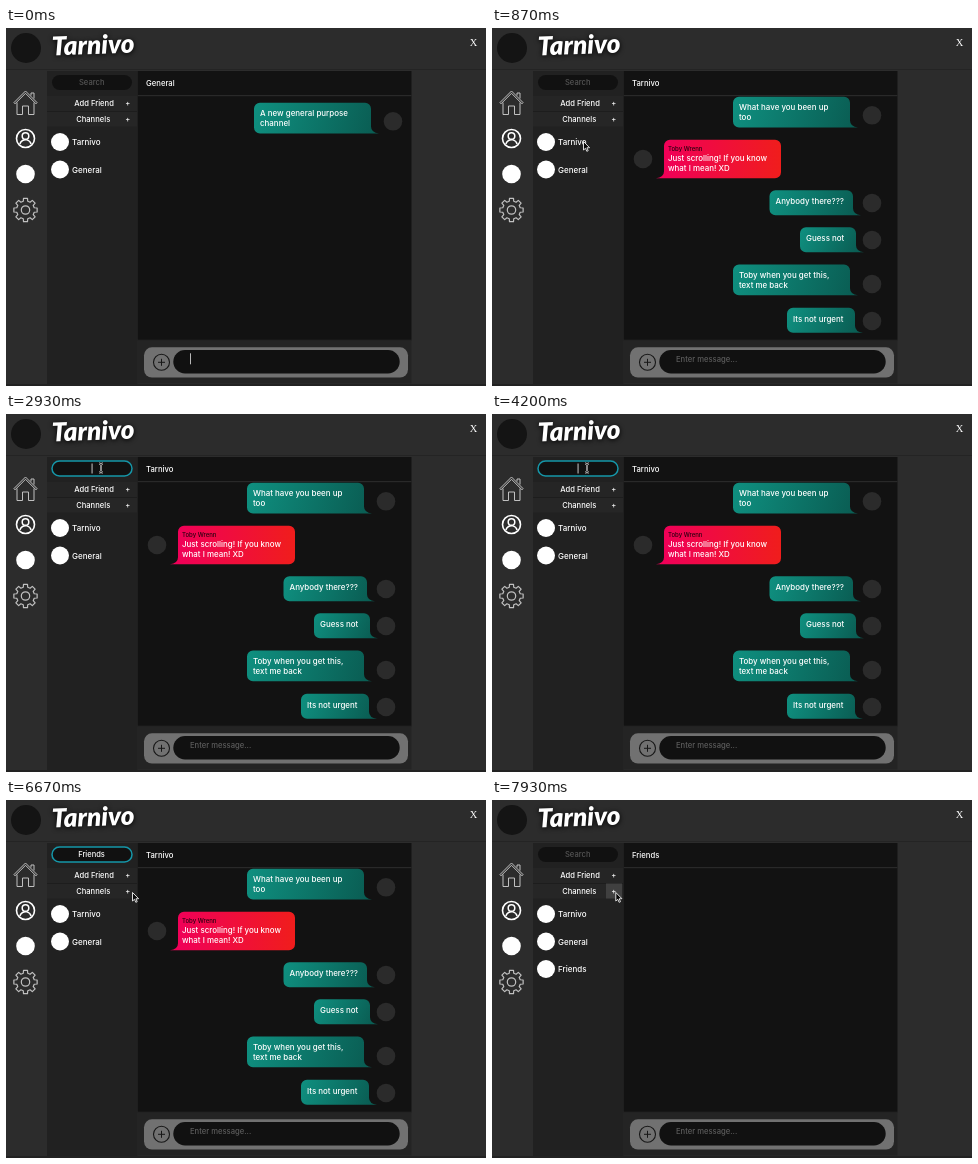
Write an HTML page with a canvas that moves like this. It is 480x358 px and loops after 8 s.

```html
<!DOCTYPE html>
<html lang="en">
<head>
<meta charset="utf-8">
<title>Chat channels</title>
<style>
  html, body { margin: 0; width: 100%; height: 100%; overflow: hidden; background: #2c2c2c; }
  canvas { display: block; width: 480px; height: 358px; }
</style>
</head>
<body>
<canvas id="stage"></canvas>
<script>
const W = 480, H = 358, LOOP = 8000;
const SANS = 'Inter, "Open Sans", sans-serif';
const APP = 'Tarnivo';
const canvas = document.getElementById('stage');
const ctx = canvas.getContext('2d');
const dpr = window.devicePixelRatio || 1;
canvas.width = W * dpr;
canvas.height = H * dpr;

const GENERAL = [
  { x: 248, y: 74.7, w: 117, h: 30.8, lines: ['A new general purpose', 'channel'], avatar: [387, 93.3] }
];
const CHAT = [
  { x: 241, y: 68.7, w: 117, h: 30.8, lines: ['What have you been up', 'too'], avatar: [380, 87.3] },
  { x: 172, y: 111.8, w: 117, h: 38.4, lines: ['Just scrolling! If you know', 'what I mean! XD'], avatar: [151, 131], from: 'Toby Wrenn' },
  { x: 277.5, y: 162.2, w: 83.5, h: 25, lines: ['Anybody there???'], avatar: [380, 175] },
  { x: 308, y: 199.2, w: 56, h: 25, lines: ['Guess not'], avatar: [380, 212] },
  { x: 241, y: 236.5, w: 117, h: 30.8, lines: ['Toby when you get this,', 'text me back'], avatar: [380, 256] },
  { x: 295, y: 279.8, w: 68, h: 25, lines: ['Its not urgent'], avatar: [380, 293] }
];

// Search text: [time, value]
const TYPING = [[4530, 'F'], [4730, 'Fr'], [5200, 'Fri'], [5330, 'Frie'], [5470, 'Frien'], [5600, 'Friend'], [5730, 'Friends']];
// Pointer stops: [time, x, y]
const POINTER = [[70, 174, 236], [200, 157, 212], [400, 157, 212], [730, 91, 113], [1400, 91, 113],
  [1730, 95, 54], [5870, 95, 54], [6200, 112, 64], [6670, 126, 92], [6730, 126, 92], [7070, 123.3, 92]];

const clamp = v => Math.max(0, Math.min(1, v));
const ease = v => v * v * (3 - 2 * v);
const between = (t, a, b) => t >= a && t < b;

function rect(x, y, w, h, color) {
  ctx.fillStyle = color;
  ctx.fillRect(x, y, w, h);
}

function pill(x, y, w, h, r, color) {
  ctx.beginPath();
  ctx.roundRect(x, y, w, h, r);
  ctx.fillStyle = color;
  ctx.fill();
}

function disc(x, y, r, fill, stroke, line = 1) {
  ctx.beginPath();
  ctx.arc(x, y, r, 0, Math.PI * 2);
  if (fill) { ctx.fillStyle = fill; ctx.fill(); }
  if (stroke) { ctx.strokeStyle = stroke; ctx.lineWidth = line; ctx.stroke(); }
}

function label(text, x, y, size = 7.8, color = '#fff', align = 'left') {
  ctx.font = `500 ${size}px ${SANS}`;
  ctx.textAlign = align;
  ctx.textBaseline = 'alphabetic';
  ctx.fillStyle = color;
  ctx.fillText(text, x, y);
}

function poly(points, close) {
  ctx.beginPath();
  points.forEach(([x, y]) => ctx.lineTo(x, y));
  if (close) ctx.closePath();
}

function drawHeader() {
  disc(20, 20, 15, '#141414');
  ctx.save();
  ctx.translate(46, 27.5);
  ctx.rotate(-0.035);
  ctx.shadowColor = '#000';
  ctx.shadowBlur = 5 * dpr;
  ctx.shadowOffsetY = dpr;
  ctx.font = 'italic 900 26px Lato, sans-serif';
  ctx.textAlign = 'left';
  ctx.fillStyle = '#fff';
  ctx.fillText(APP, 0, 0);
  ctx.restore();
  ctx.font = '10.5px "Liberation Serif", serif';
  ctx.textAlign = 'center';
  ctx.fillStyle = '#fff';
  ctx.fillText('X', 467.5, 17.5);
}

function drawNav() {
  ctx.strokeStyle = '#c0c0c0';
  ctx.lineWidth = 1;
  ctx.lineJoin = 'round';
  poly([[8, 74.5], [19.5, 63], [31, 74.5], [30, 75.8], [19.5, 65.3], [9, 75.8]], true);
  ctx.stroke();
  poly([[11, 74.5], [11, 86.5], [16.5, 86.5], [16.5, 78], [22.5, 78], [22.5, 86.5], [28, 86.5], [28, 74.5]]);
  ctx.stroke();
  poly([[25, 67.5], [25, 65], [28, 65], [28, 70.5]]);
  ctx.stroke();

  disc(19.5, 110.5, 9, null, '#fff', 1.6);
  disc(19.5, 108, 3.3, null, '#fff', 1.5);
  ctx.beginPath();
  ctx.arc(19.5, 117.5, 5.8, Math.PI * 1.08, Math.PI * 1.92);
  ctx.stroke();

  disc(19.5, 146, 9.3, '#fff');

  const teeth = [];
  for (let i = 0; i < 8; i++) {
    [[-0.25, 9], [-0.17, 11.8], [0.17, 11.8], [0.25, 9]].forEach(([d, r]) => {
      const a = i * Math.PI / 4 + d;
      teeth.push([19.5 + r * Math.cos(a), 182 + r * Math.sin(a)]);
    });
  }
  poly(teeth, true);
  ctx.strokeStyle = '#c0c0c0';
  ctx.lineWidth = 1.2;
  ctx.stroke();
  disc(19.5, 182, 4.2, null, '#c0c0c0', 1.2);
}

function drawSearch(t) {
  const focused = between(t, 1930, 7730);
  pill(46, 47, 80, 15, 7.5, '#111');
  if (!focused) {
    label('Search', 85.7, 57.3, 7.6, '#555', 'center');
    return;
  }
  ctx.globalAlpha = 0.5 + 0.5 * clamp((t - 1930) / 140);
  ctx.beginPath();
  ctx.roundRect(46, 47, 80, 15, 7.5);
  ctx.strokeStyle = '#1596a8';
  ctx.lineWidth = 1.5;
  ctx.stroke();
  ctx.globalAlpha = 1;

  let value = '';
  for (const [at, text] of TYPING) if (t >= at) value = text;
  label(value, 85.5, 57.3, 7.5, '#fff', 'center');
  const end = 86 + ctx.measureText(value).width / 2;
  const hidden = between(t, 2400, 2930) || between(t, 3400, 3930) ||
    between(t, 6230, 6730) || t >= 7270;
  if (!hidden) rect(end - 0.4, 49.5, 0.9, 10, '#ddd');
}

function drawChannels(t) {
  rect(41, 43, 90.5, 313, '#212121');
  drawSearch(t);
  rect(41, 68, 90, 15, '#252525');
  rect(41, 83.5, 90, 15, '#262626');
  rect(41, 83, 90, 0.7, '#1b1b1b');
  ctx.globalAlpha = clamp((t - 6730) / 200);
  rect(114, 83.5, 16, 15, '#404040');
  ctx.globalAlpha = 1;
  label('Add Friend', 88, 78.2, 7.6, '#fff', 'center');
  label('Channels', 87.2, 93.8, 7.6, '#fff', 'center');
  label('+', 121.7, 78.2, 7.5, '#fff', 'center');
  label('+', 121.7, 93.8, 7.5, '#fff', 'center');
  const names = [APP, 'General'];
  if (t >= 7870) names.push('Friends');
  names.forEach((name, i) => {
    const y = 114 + i * 27.5;
    disc(54, y, 9, '#fff');
    label(name, 66, y + 3, 8);
  });
}

function bubble({ x, y, w, h, lines, avatar, from }) {
  ctx.save();
  ctx.translate(from ? x + w : x, y);
  if (from) ctx.scale(-1, 1);
  const r = 6;
  ctx.beginPath();
  ctx.moveTo(r, 0);
  ctx.arcTo(w, 0, w, r, r);
  ctx.lineTo(w, h - 7);
  ctx.quadraticCurveTo(w, h - 1, w + 8, h);
  ctx.lineTo(r, h);
  ctx.arcTo(0, h, 0, h - r, r);
  ctx.arcTo(0, 0, r, 0, r);
  ctx.closePath();
  const g = ctx.createLinearGradient(0, 0, w, from ? 0 : h);
  g.addColorStop(0, from ? '#f01d1c' : '#0f9080');
  g.addColorStop(1, from ? '#f00058' : '#0a5e54');
  ctx.fillStyle = g;
  ctx.fill();
  ctx.restore();

  if (from) label(from, x + 4, y + 11.5, 6, '#2a0010');
  const first = y + (from ? 20.7 : h === 25 ? 13.8 : 13.5);
  lines.forEach((text, i) => label(text, x + (from ? 4 : 6), first + i * 10, 7.95));
  disc(avatar[0], avatar[1], 9.3, '#2b2b2b');
}

function drawChat(t) {
  rect(131.7, 43, 273.8, 268, '#121212');
  rect(131.7, 67, 273.8, 1.2, '#292929');
  rect(131.7, 311, 273.8, 1.5, '#171717');
  rect(131.7, 312.5, 273.8, 43, '#242424');
  const title = t < 870 ? 'General' : t < 7870 ? APP : 'Friends';
  label(title, 140, 57.5, 7.7);
  if (t < 870) GENERAL.forEach(bubble);
  else if (t < 7870) CHAT.forEach(bubble);

  pill(138, 319.3, 264, 30.3, 8, '#717171');
  disc(155.5, 334.3, 8, null, '#171717', 1.1);
  rect(152, 333.8, 7, 1, '#171717');
  rect(155, 330.8, 1, 7, '#171717');
  pill(167.3, 322, 226.4, 23.5, 11.7, '#111');
  if (t >= 870) label('Enter message...', 184, 333.5, 7.65, '#5c5c5c');
  else if (t < 470) rect(184, 325.3, 0.9, 11, '#ccc');
}

function pointerAt(t) {
  let i = 0;
  while (i < POINTER.length - 1 && POINTER[i + 1][0] <= t) i++;
  const [t0, x0, y0] = POINTER[i];
  const [t1, x1, y1] = POINTER[i + 1] || [t0 + 1, x0, y0];
  const k = ease(clamp((t - t0) / (t1 - t0)));
  return [x0 + (x1 - x0) * k, y0 + (y1 - y0) * k];
}

function drawPointer(t) {
  if (t < 70) return;
  const [x, y] = pointerAt(t);
  const overSearch = between(x, 46, 126) && between(y, 47, 62);
  ctx.save();
  ctx.translate(x, y);
  ctx.lineJoin = 'round';
  if (overSearch) {
    ctx.beginPath();
    ctx.moveTo(-2, -4.5);
    ctx.quadraticCurveTo(0, -4.5, 0, -3);
    ctx.lineTo(0, 3);
    ctx.quadraticCurveTo(0, 4.5, -2, 4.5);
    ctx.moveTo(2, -4.5);
    ctx.quadraticCurveTo(0, -4.5, 0, -3);
    ctx.moveTo(0, 3);
    ctx.quadraticCurveTo(0, 4.5, 2, 4.5);
    ctx.strokeStyle = '#ddd';
    ctx.lineWidth = 2;
    ctx.stroke();
    ctx.strokeStyle = '#111';
    ctx.lineWidth = 0.8;
    ctx.stroke();
  } else {
    poly([[0.5, 0.5], [0.5, 9], [2.5, 7.3], [3.8, 10.3], [5.2, 9.7], [3.9, 6.8], [6.6, 6.7]], true);
    ctx.fillStyle = '#080808';
    ctx.fill();
    ctx.strokeStyle = '#f2f2f2';
    ctx.lineWidth = 0.9;
    ctx.stroke();
  }
  ctx.restore();
}

function draw(t) {
  ctx.setTransform(dpr, 0, 0, dpr, 0, 0);
  rect(0, 0, W, H, '#2c2c2c');
  rect(0, 41, W, 1, '#242424');
  drawHeader();
  drawNav();
  drawChannels(t);
  drawChat(t);
  rect(0, 356, W, 2, '#222');
  drawPointer(t);
}

const start = performance.now();
function tick() {
  draw((performance.now() - start) % LOOP);
  requestAnimationFrame(tick);
}
tick();
</script>
</body>
</html>
```
